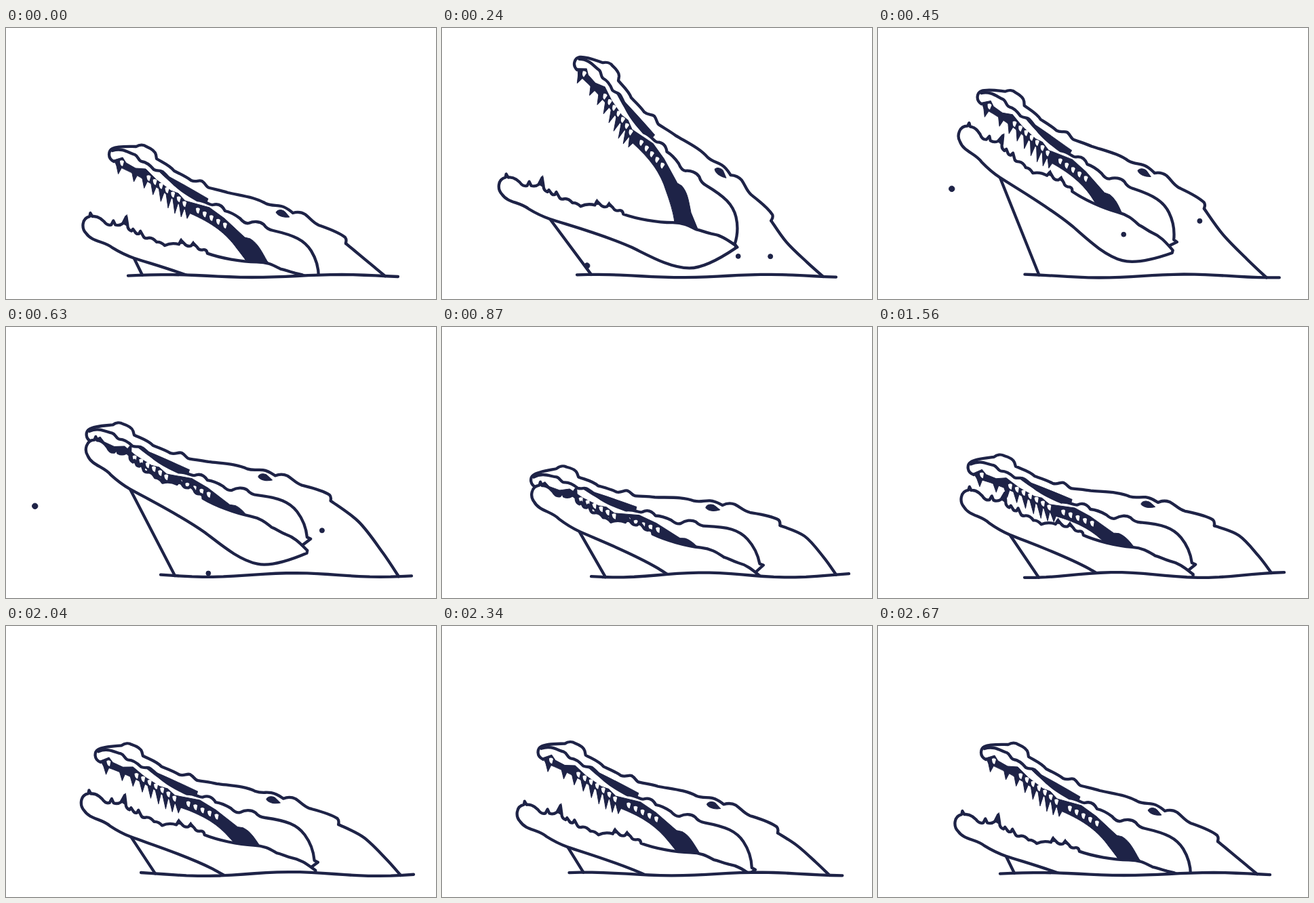
Write an HTML page that moves like this. It is 634 px wide and 400 px high and loops after 2700 ms.

```html
<!DOCTYPE html>
<html lang="en">
<head>
<meta charset="utf-8">
<title>Crocodile</title>
<style>
  html, body { margin: 0; width: 100%; height: 100%; overflow: hidden; background: #fff; }
  svg { display: block; width: 100vw; height: 100vh; }
  .line { fill: none; stroke: #1e2347; stroke-width: 4.3; stroke-linecap: round; stroke-linejoin: round; }
  .ink { fill: #1e2347; stroke: #1e2347; stroke-width: 1; stroke-linejoin: round; }
  .skin, .tooth { fill: #fff; }
</style>
</head>
<body>
<svg viewBox="0 0 634 400">
  <defs>
    <clipPath id="air"><path id="airShape"/></clipPath>
  </defs>
  <path id="neck" class="line"/>
  <path id="throat" class="line"/>
  <g clip-path="url(#air)">
    <g id="head">
      <path class="ink" d="M159 195L172 191L177 199L191 207L206 208L222 224L243 240L254 244L264 255L300 265L322 281L352 309L360 311C372 318 378 332 385 344L404 366L368 368C360 350 350 338 340 325C325 304 305 288 270 273Q222 228 163 203Z"/>
      <g id="teeth"></g>
      <path class="ink" d="M226 212C250 224 274 238 298 252L296 257L282 255C266 246 248 234 226 212Z"/>
      <path class="line" d="M159 197C149 192 151 181 157 178C165 174 180 175 192 175C197 172 203 172 207 175C214 178 220 182 221 187L222 193C232 199 242 203 248 211C256 215 265 219 273 225C280 228 284 224 289 226C295 230 295 235 300 236C312 239 318 240 327 243C350 248 368 250 383 259C392 263 398 261 406 263C414 265 418 269 423 273C430 271 436 272 441 275C449 281 452 287 461 291C475 296 490 301 500 309C503 313 501 315 501 318"/>
      <path class="line" d="M157 181C172 176 182 185 190 187C195 189 195 196 200 197C208 198 213 203 218 209C224 212 228 209 232 213C240 220 244 227 250 232C262 243 272 248 282 254C295 255 300 262 305 261C315 258 320 264 323 270C332 272 337 275 345 281C350 287 354 289 358 288C365 285 374 285 380 290C384 296 388 298 394 299C425 306 440 313 450 329C458 342 461 355 461 368L466 371L453 379"/>
      <path class="ink" d="M398 272C401 267 409 268 412 272L418 279C410 280 401 278 398 272Z"/>
      <g id="jaw">
        <path class="line skin" d="M96 222C84 225 84 240 91 247C100 260 118 258 130 268C140 274 150 279 162 283C190 292 240 305 283 324C310 337 340 354 368 354C390 354 420 335 436 324L436 320C425 313 415 305 400 303C390 301 385 298 378 297C368 292 360 287 343 287C320 287 290 282 270 275Q269 268 262 270Q257 270 255 266L249 260L246 264Q240 266 236 261L231 256L228 262Q217 259 207 264Q201 258 195 259Q189 252 183 253Q177 255 175 250L171 243L169 247Q165 248 163 244L160 240L158 243Q152 241 152 234L150 222L145 232Q140 236 134 234L131 228L128 234Q122 236 117 229L112 225Q106 221 100 222L97 217Z"/>
        <path class="ink" d="M145 232L151 219L152 236ZM246 263L249 257L253 265ZM229 261L231 253L235 261Z"/>
      </g>
    </g>
  </g>
  <path id="water" class="line"/>
  <g id="drops" class="ink"></g>
</svg>
<script>
const LOOP = 2700, STEP = 30;
const EYE = [407, 274], HINGE = [432, 373], NAPE = [501, 318];
const TIP = [86, 232], CHIN = [162, 283], SHUT_TIP = [150.5, 201], SHUT = 17;
const $ = id => document.getElementById(id);

// time, eye x, eye y, head tilt, gape, water's left end, neck end
const poses = [
  [0, 407, 274, 0, 16.5, 180, 559],
  [240, 410, 213, 18.4, 35, 199, 562],
  [540, 384, 214, -1, 0, 223, 577],
  [630, 381, 222, -5.6, 0, 228, 579],
  [870, 398, 267, -10.6, 0, 220, 581],
  [1560, 397, 262, -7.5, 5, 216, 580],
  [2040, 393, 257, -4.8, 9.6, 199, 582],
  [2670, 407, 274, 0, 16.5, 180, 559]
];

// Monotone cubic through the poses
function poseAt(t) {
  const end = poses.length - 1;
  let i = 0;
  while (i < end - 1 && t >= poses[i + 1][0]) i++;
  const h = poses[i + 1][0] - poses[i][0], u = Math.min(1, (t - poses[i][0]) / h), v = 1 - u;
  const slope = (k, c) => (poses[k + 1][c] - poses[k][c]) / (poses[k + 1][0] - poses[k][0]);
  const tangent = (k, c) => {
    if (k === 0 || k === end) return 0;
    const a = slope(k - 1, c), b = slope(k, c);
    return a * b <= 0 ? 0 : 2 * a * b / (a + b);
  };
  return poses[i].map((a, c) => a * v * v * (1 + 2 * u) + poses[i + 1][c] * u * u * (3 - 2 * u)
    + h * u * v * (v * tangent(i, c) - u * tangent(i + 1, c))).slice(1);
}

// Moves p so that pivot "from" lands on "to", turned by deg
function turn(p, from, to, deg) {
  const r = deg * Math.PI / 180, c = Math.cos(r), s = Math.sin(r);
  const x = p[0] - from[0], y = p[1] - from[1];
  return [to[0] + x * c - y * s, to[1] + x * s + y * c];
}

function smooth(p) {
  let d = `M${p[0]}`;
  for (let i = 0; i < p.length - 1; i++) {
    const a = p[i - 1] || p[i], b = p[i], c = p[i + 1], e = p[i + 2] || c;
    d += `C${b[0] + (c[0] - a[0]) / 6},${b[1] + (c[1] - a[1]) / 6} `
      + `${c[0] - (e[0] - b[0]) / 6},${c[1] - (e[1] - b[1]) / 6} ${c}`;
  }
  return d;
}

// Teeth follow the lower edge of the gum
function growTeeth() {
  const gum = u => [163, 203].map((a, i) =>
    a * (1 - u) ** 2 + 2 * u * (1 - u) * [222, 228][i] + u * u * [270, 272][i]);
  const gap = (x, y) => `<path class="tooth" d="M${x - 3} ${y - 3}q4 -2 6 1l-2 7q-4 -1 -4 -8z"/>`;
  let svg = '';
  for (let i = 0; i < 9; i++) {
    const u = i / 8, [x, y] = gum(.03 + .95 * u ** .75);
    const size = 11 + 8 * Math.sin(Math.PI * u * u);
    svg += `<path class="ink" d="M${x - 4} ${y - 3}l3 ${size + 3}l6 ${-size}z"/>`;
  }
  for (let i = 0; i < 7; i++) {
    const [x, y] = gum(.4 + .085 * i);
    svg += gap(x + 2, y - 5);
  }
  for (let i = 0; i < 5; i++) svg += gap(283 + 10 * i, 269 + 5.5 * i);
  $('teeth').innerHTML = svg + gap(171, 199);
}

// Each drop: first and last moment, radius, flight by progress
const drops = [
  [225, 660, 4.2, u => [222 - 185 * (1 - (1 - u) ** 1.3), 365 - 420 * u + 335 * u * u]],
  [180, 645, 3.4, u => [458 - 165 * u, 366 - 260 * u + 266 * u * u]],
  [180, 800, 3.5, u => [487 - 29 * u, 366 - 330 * u + 330 * u * u]]
];

function draw(t) {
  const [ex, ey, tilt, gape, left, neckEnd] = poseAt(t);
  const eye = [ex, ey], right = neckEnd + 19, footX = left + 21;
  const sway = Math.cos(2 * Math.PI * t / LOOP);
  const surface = x => 366 + (3 - sway) * Math.cos((x - 290 - 75 * sway) * 2 * Math.PI / 255);

  $('head').setAttribute('transform', `translate(${eye}) rotate(${tilt}) translate(${EYE.map(n => -n)})`);
  $('jaw').setAttribute('transform', `rotate(${-gape},${HINGE}) translate(${SHUT_TIP}) `
    + `rotate(${SHUT}) translate(${TIP.map(n => -n)})`);

  const nape = turn(NAPE, EYE, eye, tilt);
  const dx = neckEnd - nape[0], dy = surface(neckEnd) - nape[1], length = Math.hypot(dx, dy);
  const bulge = Math.max(-5, Math.min(12, -1.8 * tilt));
  const along = (u, out) => [nape[0] + dx * u + dy / length * out, nape[1] + dy * u - dx / length * out];
  $('neck').setAttribute('d', smooth([nape, along(.34, bulge), along(.72, bulge * .6), along(1, 0)]));

  const shutChin = turn(CHIN, TIP, SHUT_TIP, SHUT);
  const chin = turn(turn(shutChin, HINGE, HINGE, -gape), EYE, eye, tilt);
  $('throat').setAttribute('d', `M${chin}L${footX},${surface(footX)}`);

  const wave = [];
  for (let i = 0; i <= 24; i++) {
    const x = left + (right - left) * i / 24;
    wave.push([x, surface(x)]);
  }
  $('water').setAttribute('d', 'M' + wave.join('L'));
  $('airShape').setAttribute('d', `M0,0V366L${wave.join('L')}L634,366V0Z`);

  $('drops').innerHTML = drops.filter(([a, b]) => t >= a && t <= b).map(([a, b, r, flight]) => {
    const [x, y] = flight((t - a) / (b - a));
    return `<circle cx="${x}" cy="${y}" r="${r}"/>`;
  }).join('');
}

growTeeth();
const start = performance.now();
function tick() {
  const t = (performance.now() - start) % LOOP;
  draw(Math.floor(t / STEP) * STEP);
  requestAnimationFrame(tick);
}
tick();
</script>
</body>
</html>
```
